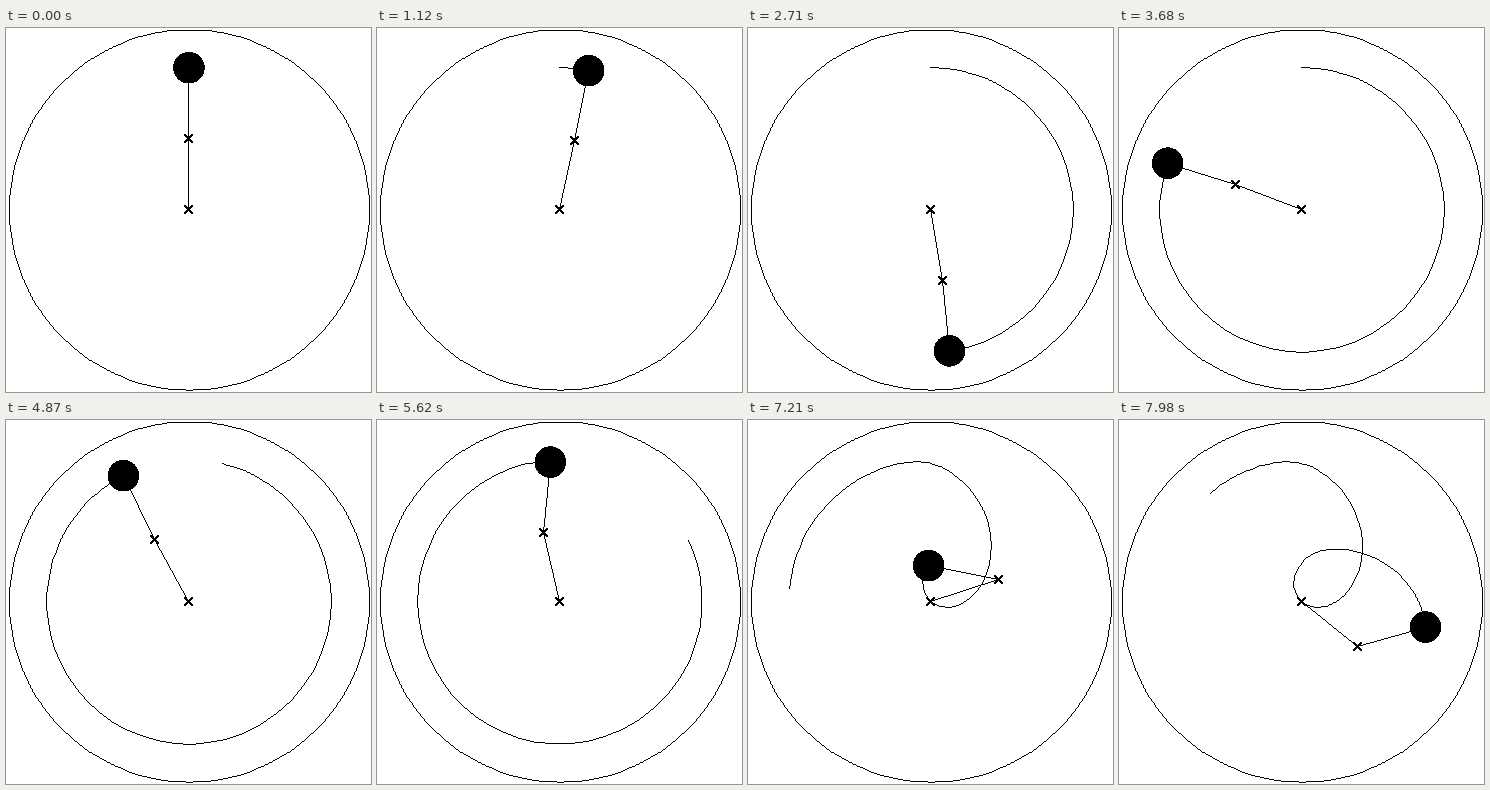
These frames come from a looping animation (365x364 px, 8000 ms). A matplotlib script:

```python
import numpy as np
import matplotlib.pyplot as plt
from matplotlib.animation import FuncAnimation

W, H, DPI = 365, 364, 100
LOOP, TICK = 8000, 20              # ms
PIVOT = np.array([182.4, 181.4])
ARM, BOB = 71.1, 15.8
RIM_CENTER, RIM = np.array([183, 181.5]), 180

START, STEP, BEAT = 500, 50, 826   # 50 ms steps, realigned on every beat
TRAIL_LIFE = 3680                  # ms

# A few key poses of the swing: time in ms, then both arm angles in degrees,
# clockwise from straight up.
POSES = np.array([
    (START, 0, 0), (1120, 12.7, 12.2), (2110, 84.5, 84.5),
    (2710, 172, 175.2), (3680, 290.7, 288), (4870, 332.5, 335.1),
    (5420, 344.7, 354.7), (6390, 349.3, 441.9), (6620, 356, 476.5),
    (6864, 375, 528.6), (7206, 431.3, 640.7), (7620, 470.5, 720.5),
    (7980, 489, 794)])
KEYS, ANGLES = POSES[:, 0], POSES[:, 1:]
SLOPES = np.gradient(ANGLES, KEYS, axis=0)

ROWS, COLS = np.mgrid[:H, :W]


def step_time(t):
    since = max(t - START, 0)
    return t - since % BEAT % STEP if since else START


def arm_angles(t):
    """Cubic Hermite interpolation of both angles, in radians."""
    t = np.clip(np.atleast_1d(t), KEYS[0], KEYS[-1])
    i = np.clip(np.searchsorted(KEYS, t, side="right") - 1, 0, len(KEYS) - 2)
    span = (KEYS[i + 1] - KEYS[i])[:, None]
    u = (t - KEYS[i])[:, None] / span
    angle = ((1 + 2 * u) * (1 - u) ** 2 * ANGLES[i]
             + u * (1 - u) ** 2 * span * SLOPES[i]
             + u * u * (3 - 2 * u) * ANGLES[i + 1]
             + u * u * (u - 1) * span * SLOPES[i + 1])
    return np.radians(angle)


def around(center, radius, angle):
    return center + radius * np.column_stack([np.sin(angle), -np.cos(angle)])


def positions(t):
    """Joint and bob positions, one row per time."""
    upper, lower = arm_angles(t).T
    joint = around(PIVOT, ARM, upper)
    return joint, around(joint, ARM, lower)


def draw_path(canvas, points):
    """Hard-edged polyline, one pixel wide."""
    points = np.rint(points).astype(int)
    for a, b in zip(points[:-1], points[1:]):
        count = np.abs(b - a).max() + 1
        x, y = np.rint(np.linspace(a, b, count)).astype(int).T
        canvas[y, x] = 0


def draw_cross(canvas, center):
    x, y = np.rint(center)
    dx, dy = np.abs(COLS - x), np.abs(ROWS - y)
    canvas[(np.abs(dx - dy) <= 1) & (np.maximum(dx, dy) <= 4)] = 0


def draw_disc(canvas, center, radius):
    canvas[np.hypot(COLS - center[0], ROWS - center[1]) <= radius] = 0


background = np.full((H, W), 255, np.uint8)
draw_path(background, around(RIM_CENTER, RIM, np.linspace(0, 2 * np.pi, 181)))

fig = plt.figure(figsize=(W / DPI, H / DPI), dpi=DPI, facecolor="white")
ax = fig.add_axes([0, 0, 1, 1])
ax.axis("off")
picture = ax.imshow(background, cmap="gray", vmin=0, vmax=255,
                    interpolation="nearest", aspect="auto")


def draw(frame):
    now = step_time(frame * TICK + TICK // 2)
    joint, bob = (p[0] for p in positions(now))
    oldest = max(START, now - TRAIL_LIFE)
    moments = np.append(np.arange(oldest, now, STEP), now)

    canvas = background.copy()
    draw_path(canvas, positions(moments)[1])
    draw_path(canvas, [PIVOT, joint, bob])
    draw_cross(canvas, PIVOT)
    draw_cross(canvas, joint)
    draw_disc(canvas, bob, BOB)
    picture.set_data(canvas)
    return picture,


anim = FuncAnimation(fig, draw, frames=LOOP // TICK, interval=TICK,
                     repeat=True, repeat_delay=0)
plt.show()
```
